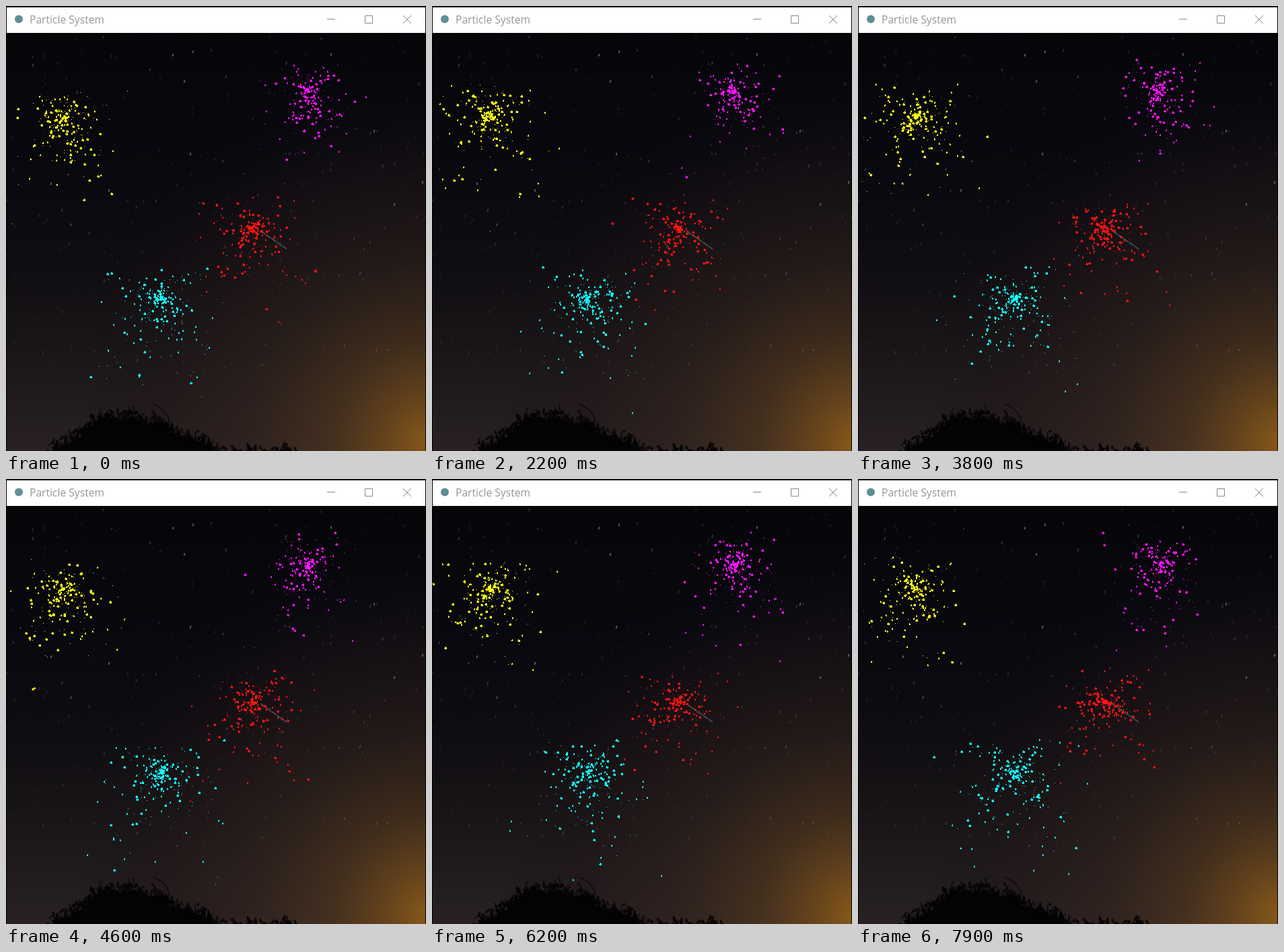
Recreate the animation shown at these times as an HTML page with a canvas. Size 624x661 px, loop 8 s.

```html
<!DOCTYPE html>
<html lang="en">
<head>
<meta charset="utf-8">
<title>Particle System</title>
<style>
html, body { margin: 0; width: 100%; height: 100%; overflow: hidden; background: #000; }
canvas { position: absolute; left: 0; top: 0; }
.bar { position: absolute; left: 1px; top: 2px; width: 622px; height: 38px; background: #fff; }
.bar span { position: absolute; left: 34px; top: 7px; font: 15.65px/22px "Open Sans", "Noto Sans", sans-serif; color: #969696; white-space: nowrap; }
.bar svg { position: absolute; left: 0; top: 0; }
</style>
</head>
<body>
<canvas id="stage" width="624" height="661"></canvas>
<div class="bar">
  <span>Particle System</span>
  <svg width="622" height="38" fill="none" stroke="#888">
    <circle cx="18" cy="17.5" r="6" fill="#5f8f96" stroke="none"/>
    <path d="M476 17.5h12M532.5 12.5h11v11h-11zM589 12l12 12M601 12l-12 12"/>
  </svg>
</div>
<script>
const W = 624, H = 661, TOP = 40;
const LOOP = 8000, STEP = 100, LIFE = 2000;
const ctx = document.getElementById('stage').getContext('2d');

// x, y, colour, horizontal reach, fall, count
const emitters = [
  [87, 164, '#ffff14', 116, 76, 230],
  [449, 127, '#ff14ff', 98, 60, 220],
  [367, 331, '#ff1414', 116, 70, 245],
  [231, 435, '#14ffff', 122, 74, 250]
];

function random(seed) {
  return () => {
    seed = seed + 0x6D2B79F5 | 0;
    let n = Math.imul(seed ^ seed >>> 15, 1 | seed);
    n = n + Math.imul(n ^ n >>> 7, 61 | n) ^ n;
    return ((n ^ n >>> 14) >>> 0) / 4294967296;
  };
}

function gradient(g, shade, stops) {
  stops.forEach(([at, colour]) => shade.addColorStop(at, colour));
  g.fillStyle = shade;
  g.fillRect(1, TOP, W - 2, H - TOP);
}

function drawStars(g) {
  const r = random(11);
  for (let i = 0; i < 240; i++) {
    const x = r() * W, y = TOP + 6 + r() * 500;
    g.fillStyle = `rgba(150,155,160,${0.08 + r() * r() * 0.35})`;
    g.beginPath();
    g.ellipse(x, y, 0.8 + r() * 0.5, 1.2 + r() * 1.8, 0.25, 0, 7);
    g.fill();
  }
  g.fillStyle = 'rgba(150,155,160,.55)';
  [[248, 73], [278, 68], [265, 112], [153, 274], [577, 295], [274, 220],
   [619, 262], [483, 72], [547, 186], [67, 264]].forEach(([x, y]) => {
    g.beginPath();
    g.ellipse(x, y, 1.1, 2.3, 0.2, 0, 7);
    g.fill();
  });
  g.strokeStyle = '#484b4c';
  g.lineWidth = 2;
  g.setLineDash([9, 1]);
  g.beginPath();
  g.moveTo(378, 334);
  g.lineTo(417, 361);
  g.stroke();
}

function drawTrees(g) {
  const r = random(5);
  const ridge = [[56, 661], [66, 656], [85, 641], [105, 633], [122, 618], [145, 600], [162, 605],
    [185, 601], [208, 610], [230, 609], [243, 624], [268, 634], [290, 635], [306, 648],
    [318, 658], [350, 660], [375, 656], [400, 661], [418, 654], [436, 661]];
  g.fillStyle = '#040305';
  g.beginPath();
  g.moveTo(56, H);
  ridge.forEach(([x, y]) => g.lineTo(x, y + 12));
  g.lineTo(436, H);
  g.fill();
  for (let i = 0; i < ridge.length - 1; i++) {
    const [x, y] = ridge[i], [nx, ny] = ridge[i + 1];
    const leaves = Math.hypot(nx - x, ny - y) * 1.7;
    for (let n = 0; n < leaves; n++) {
      const k = r();
      g.fillStyle = `rgba(4,3,5,${0.5 + r() * 0.5})`;
      g.beginPath();
      g.ellipse(x + (nx - x) * k, y + (ny - y) * k + Math.sqrt(r()) * 24 - 7,
        0.8 + r() * 1.6, 2 + r() * 3.5, r() * 1.8 - 0.9, 0, 7);
      g.fill();
    }
  }
  g.strokeStyle = '#0c090b';
  g.setLineDash([3, 1]);
  g.lineWidth = 2;
  g.beginPath();
  g.moveTo(219, 592);
  g.quadraticCurveTo(238, 598, 243, 618);
  g.stroke();
}

function drawSky() {
  const sky = document.createElement('canvas');
  sky.width = W;
  sky.height = H;
  const g = sky.getContext('2d');
  g.fillRect(0, 0, W, H);
  gradient(g, g.createLinearGradient(0, TOP, 0, H),
    [[0, '#060609'], [0.3, '#08080f'], [0.55, '#0f0d12'], [0.75, '#191517'], [1, '#292123']]);
  gradient(g, g.createRadialGradient(635, 650, 0, 635, 650, 540),
    [[0, 'rgba(150,97,24,.92)'], [0.12, 'rgba(120,78,26,.8)'], [0.28, 'rgba(82,56,30,.66)'],
     [0.5, 'rgba(52,37,29,.55)'], [0.75, 'rgba(34,23,24,.45)'], [1, 'rgba(24,17,20,0)']]);
  drawStars(g);
  drawTrees(g);
  return sky;
}

// Each slot relaunches a new particle whenever its life runs out.
function drawParticle([x0, y0, , reach, fall], slot, t) {
  const own = random(slot * 7919);
  const life = LIFE * (0.4 + 0.6 * own());
  const clock = t + own() * life + LIFE;
  const round = Math.floor(clock / life);
  const age = (clock - round * life) / LIFE;
  const r = random(slot * 7919 + round * 104729);
  const level = () => Math.floor(r() * 21 - 10) / 10;
  const rise = 2 * Math.sqrt(47 * fall);
  const x = Math.round(x0 + level() * reach * age);
  const y = Math.round(y0 + level() * rise * age + fall * age * age);
  const size = 1 + Math.floor(r() * 2.6);
  ctx.fillRect(x - 1, y - 1, size, size);
  if (size > 1) ctx.fillRect(x - (r() < 0.5), y - 2, 1, size + 1);
  if (size > 2) ctx.fillRect(x - 2, y, size + 1, 1);
}

const sky = drawSky();

function frame(now) {
  const t = Math.floor(now % LOOP / STEP) * STEP;
  ctx.drawImage(sky, 0, 0);
  ctx.save();
  ctx.beginPath();
  ctx.rect(1, TOP, W - 2, H - TOP);
  ctx.clip();
  emitters.forEach((e, i) => {
    ctx.fillStyle = e[2];
    for (let n = 0; n < e[5]; n++) drawParticle(e, i * 1000 + n + 1, t);
  });
  ctx.restore();
  requestAnimationFrame(frame);
}
requestAnimationFrame(frame);
</script>
</body>
</html>
```
